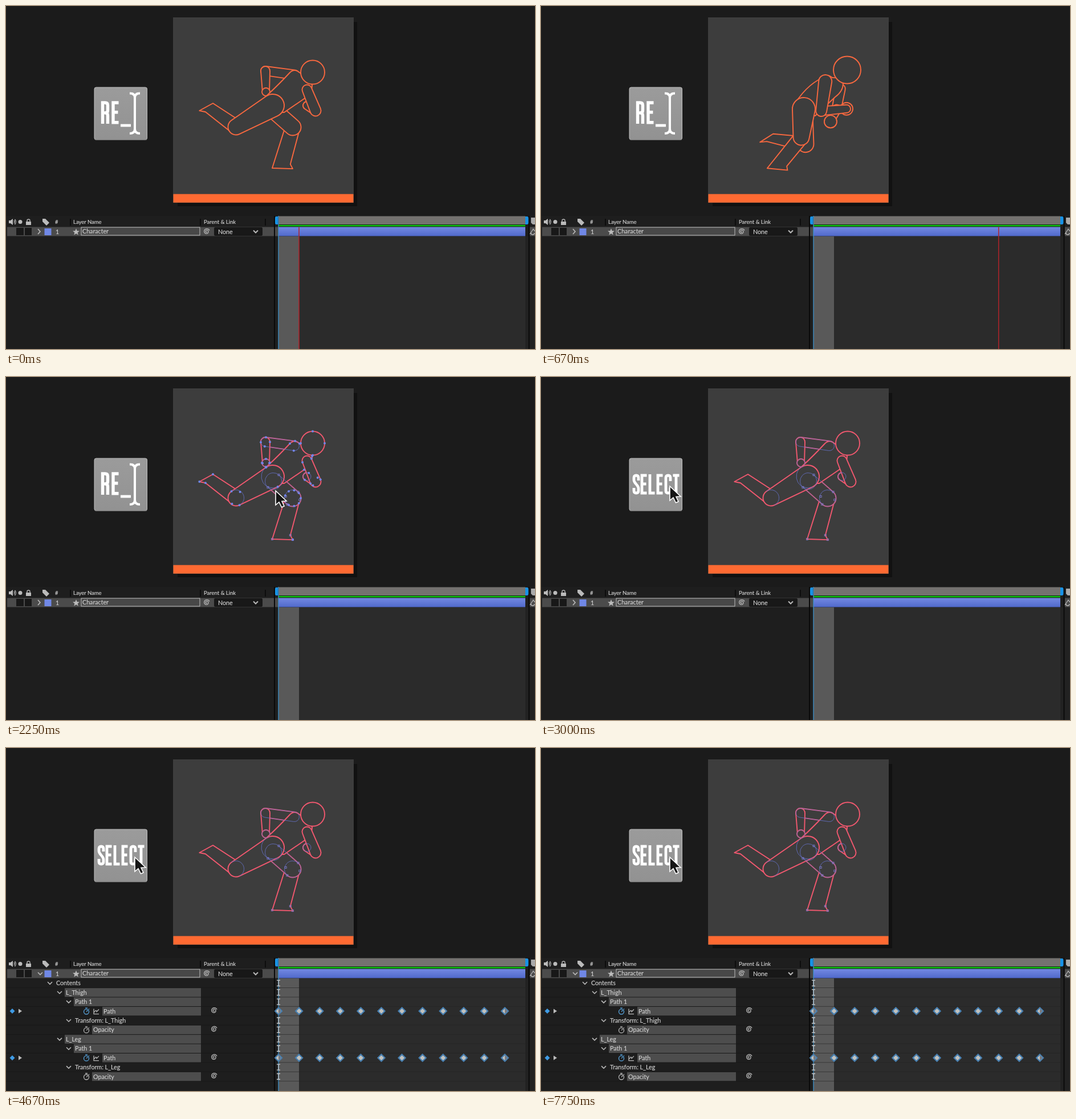
An HTML page that plays this animation: 928x603 px, repeating every 8.08 s.

```html
<!DOCTYPE html>
<html lang="en">
<head>
<meta charset="utf-8">
<title>Path selection</title>
<style>
  html, body { margin: 0; width: 100%; height: 100%; overflow: hidden; background: #1b1b1b; }
  svg { display: block; width: 928px; height: 603px; }
  text { font: 10.7px Lato, "Open Sans", sans-serif; fill: #d2d2d2; stroke: #d2d2d2; stroke-width: .15; }
  .head { font-size: 9.5px; }
  .big { font-size: 30px; letter-spacing: -2px; fill: #fff; stroke: #fff; stroke-width: .5; }
  .line { fill: none; stroke: #b8b8b8; stroke-width: 1.3; }
  .glyph { fill: none; stroke: #fff; stroke-width: 4.8; }
  .body { fill: #3d3d3d; stroke-width: 1.9; stroke-linejoin: round; }
  .hidden { fill: none; stroke: #6976d6; stroke-opacity: .75; }
  .dot { fill: #7386ec; }
  .box { fill: none; stroke: #7a78c8; stroke-width: .9; }
  .key { fill: #c2c2be; stroke: #477fb0; stroke-width: 2.2; }
</style>
</head>
<body>
<svg viewBox="0 0 928 603" xmlns="http://www.w3.org/2000/svg">
  <defs>
    <linearGradient id="cap" x2="0" y2="1"><stop stop-color="#9b9b9b"/><stop offset="1" stop-color="#929292"/></linearGradient>
    <linearGradient id="layer" x2="0" y2="1"><stop stop-color="#7389e2"/><stop offset="1" stop-color="#5069cb"/></linearGradient>
    <path id="arrow" d="M0 0V25L6 20L10.500 29L15 27L11 18.500L19 18Z" fill="#151515" stroke="#fff" stroke-width="1.6"/>
  </defs>
  <rect width="928" height="603" fill="#1b1b1b"/>

  <rect x="301" y="28" width="315" height="324" fill="#111"/>
  <rect x="293" y="20" width="317" height="326" fill="#3d3d3d"/>
  <rect x="293.500" y="330.600" width="316" height="15" fill="#ff6a32"/>
  <g id="figure"></g>

  <rect x="155" y="143" width="92.500" height="92" rx="3" fill="url(#cap)" stroke="#bdbdbd"/>
  <path d="M156 235H247" stroke="#777"/>
  <g id="rename" class="glyph"></g>
  <g id="pick" class="glyph"></g>

  <g id="hint">
    <path aria-label="S" d="M788 143Q787 110 760 110Q731 110 731 143C731 180 791 172 791 211Q791 245 761 245Q731 245 730 211" fill="none" stroke="#ea5039" stroke-width="18"/>
    <text class="big" x="704" y="291">Keyboard</text>
  </g>

  <rect y="369" width="928" height="234" fill="#1e1e1e"/>
  <rect x="478" y="405" width="433" height="198" fill="#2b2b2b"/>
  <rect x="911" y="405" width="17" height="198" fill="#222"/>
  <rect x="478" y="405" width="36" height="198" fill="#595959"/>
  <rect x="2" y="388.500" width="468" height="16" fill="#4b4b4b"/>
  <path d="M18 390H31V403H18ZM33 390H45V403H33Z" fill="#181818"/>
  <path d="M471 369V603M917.500 369V603" stroke="#0a0a0a" stroke-width="2"/>
  <path d="M113 374V386M341 374V386M455 374V386" stroke="#080808" stroke-width="1.500"/>
  <path d="M5 377H8L12 374V385L8 382H5Z" fill="#bbb"/>
  <path d="M14 377Q16 379.500 14 382M15.500 375Q19 379.500 15.500 384" class="line"/>
  <circle cx="25" cy="379.500" r="3.500" fill="#bbb"/>
  <path d="M35 379H44V385H35Z" fill="#bbb"/>
  <path d="M37 379V377Q37 375 39.500 375Q42 375 42 377V379" class="line"/>
  <path d="M64 374H69L76 381L71 386L64 379Z" fill="#bbb"/>
  <text class="head" x="86" y="383">#</text>
  <text class="head" x="118" y="383">Layer Name</text>
  <text class="head" x="347" y="383">Parent &amp; Link</text>
  <rect x="67.500" y="391" width="12" height="12" fill="#7088e6"/>
  <text x="87" y="400.500">1</text>
  <path d="M123 391L124.600 395.200L129 395.400L125.600 398.200L126.700 402.500L123 400L119.300 402.500L120.400 398.200L117 395.400L121.400 395.200Z" fill="#bbb"/>
  <rect x="132" y="389" width="208" height="14" fill="#484848" stroke="#bdbdbd"/>
  <text x="134" y="400">Character</text>
  <rect x="365" y="389" width="85" height="15" rx="2" fill="#181818"/>
  <text x="372" y="400.500">None</text>
  <path d="M434 394.500L438 398.500L442 394.500" class="line" style="stroke-width:2"/>
  <rect x="478" y="369.500" width="433" height="14.500" fill="#747270"/>
  <rect x="478" y="384" width="433" height="4.500" fill="#0c2c0c"/>
  <rect x="478" y="385" width="433" height="2.300" fill="#10c313"/>
  <rect x="472" y="388.500" width="6" height="16" fill="#4b4b4b"/>
  <rect x="478" y="388.500" width="433" height="16" fill="url(#layer)"/>
  <path d="M477 370H474Q472 370 472 373V381Q472 384 474 384H477ZM911 370H914Q916.500 370 916.500 373V381Q916.500 384 914 384H911Z" fill="#1792e6"/>
  <path d="M921 372H928V384H924L921 381Z" fill="#aaa"/>
  <rect x="919" y="388.500" width="9" height="16" fill="#4b4b4b"/>
  <path d="M919 401L925 392L928 396M921 399A3 3 0 1 0 927 399" class="line"/>
  <path id="fold" class="line" style="stroke-width:1.700"/>
  <path id="link" class="line"/>
  <path d="M478 369V603" stroke="#3d93cc" stroke-width="1.300"/>
  <g id="rows"></g>
  <path id="red" d="M0 389V603" stroke="#b3232b" stroke-width="1.500"/>
  <use id="cursor" href="#arrow"/>
</svg>
<script>
const $ = id => document.getElementById(id);
const LOOP = 8080, FPS = 0.012, STEP = 36.1;
const ORANGE = '#f9683f', PINK = '#f2586f';
const mix = (a, b, u) => a + (b - a) * u;

// Limb joints swing between two extremes: [front, back, sideways swing, sag]
const LIMB = {
  knee: [[503, 213], [403.5, 212.5], [-33, -7], [7, 24]],
  heel: [[467, 285], [363, 171], [-36, 2], [-13, 27]],
  shoulder: [[528, 147], [506, 121], [9, 0], [-5, 5]],
  elbow: [[543, 184], [455, 114], [-10, -22], [6, 34]],
  hand: [[528, 175], [456, 151], [-37, 6], [30, 29]]
};
// Body joints only bob: [rest, sag]
const CORE = {
  head: [[538, 116.5], [-1, -4]],
  hip: [[468, 175], [-7, 6]],
  top: [[506, 112], [-4, 9]],
  neck: [[537, 139], [-7, -3]]
};

// Bump once per step, two poses after contact; the mirrored bump is the flight
const turn = pose => pose * Math.PI / 6;
const bump = a => Math.max(0, (1 - Math.cos(2 * a)) / 3 + Math.sin(2 * a) / Math.sqrt(3));
const rise = a => 16 * bump(-a);

function limb(name, pose) {
  const a = turn(pose), [front, back, side, sag] = LIMB[name];
  return front.map((f, i) =>
    mix(f, back[i], (1 - Math.cos(a)) / 2) + side[i] * Math.sin(a) + sag[i] * bump(a) - i * rise(a));
}
const core = (name, pose) =>
  CORE[name][0].map((v, i) => v + CORE[name][1][i] * bump(turn(pose)) - i * rise(turn(pose)));

// Foot lies flat in stance and flips back in recovery
function toe([x, y], pose) {
  const u = Math.max(0, Math.min(1, (1 - 1.9 * Math.cos(turn(pose))) / 2));
  const angle = mix(0.03, 2.64, u), size = mix(36, 27, u);
  return [x + size * Math.cos(angle), y + size * Math.sin(angle)];
}

// Parts: outline, anchor points and, for capsules, the arcs inside the outline
const polar = ([x, y], r, a) => [x + r * Math.cos(a), y + r * Math.sin(a)];

function circle(c, r) {
  const pts = [0, 1, 2, 3].map(i => polar(c, r, i * Math.PI / 2));
  return { pts, d: `M${pts[0]}A${r} ${r} 0 1 1 ${pts[2]}A${r} ${r} 0 1 1 ${pts[0]}Z` };
}

function capsule(a, r1, b, r2) {
  const dx = b[0] - a[0], dy = b[1] - a[1], dir = Math.atan2(dy, dx);
  const off = Math.acos(Math.max(-1, Math.min(1, (r1 - r2) / Math.hypot(dx, dy))));
  const wide = +(off < Math.PI / 2);
  const pts = [polar(a, r1, dir + off), polar(a, r1, dir - off), polar(b, r2, dir - off), polar(b, r2, dir + off)];
  const arc = (r, big, p) => `A${r} ${r} 0 ${big} 1 ${p}`;
  return {
    pts,
    d: `M${pts[0]}${arc(r1, wide, pts[1])}L${pts[2]}${arc(r2, 1 - wide, pts[3])}Z`,
    inner: `M${pts[1]}${arc(r1, 1 - wide, pts[0])}M${pts[3]}${arc(r2, wide, pts[2])}`
  };
}

function shin(knee, heel, tip) {
  const dir = Math.atan2((heel[1] + tip[1]) / 2 - knee[1], (heel[0] + tip[0]) / 2 - knee[0]);
  const instep = polar([mix(heel[0], tip[0], 0.83), mix(heel[1], tip[1], 0.83)], -8, dir);
  const pts = [polar(knee, 12.7, dir + Math.PI / 2), heel, tip, instep, polar(knee, 12.7, dir - Math.PI / 2)];
  return { pts, d: `M${pts.join('L')}Z` };
}

function torso(hip, top, neck, bend) {
  const [hx, hy] = hip, [sx, sy] = top, [nx, ny] = neck;
  const back = [hx - 12 - 8 * bend, hy - 16 + 14 * bend], nape = [sx - 8, sy + 5], front = [sx + 9, sy + 5];
  const curve = [(back[0] + sx) / 2 - 8 * bend, (back[1] + sy) / 2 - 10 * bend];
  const chest = [nx - 14, ny + 24];
  return {
    pts: [back, nape, front, neck, chest],
    d: `M${back}Q${curve} ${nape}Q${sx} ${sy - 3} ${front}Q${nx - 7} ${ny - 11} ${neck}` +
      `Q${nx} ${ny + 14} ${chest}L${hx + 20} ${hy + 12}L${hx} ${hy + 12}Z`
  };
}

// Back to front
function runner(pose) {
  const other = pose + 6, bend = bump(turn(pose));
  const hip = core('hip', pose), palm = 7 + 4 * bend;
  const leg = p => {
    const heel = limb('heel', p);
    return [limb('knee', p), heel, toe(heel, p)];
  };
  const arm = p => ['shoulder', 'elbow', 'hand'].map(name => limb(name, p));
  const far = leg(pose), near = leg(other), fa = arm(other), na = arm(pose);
  return {
    farArm: capsule(fa[0], 8.5, fa[1], 8),
    farFore: capsule(fa[1], 8, fa[2], 6),
    farHand: circle(fa[2], palm),
    farShin: shin(...far),
    farThigh: capsule([hip[0] + 1, hip[1] + 8], 14.5, far[0], 14.5),
    torso: torso(hip, core('top', pose), core('neck', pose), bend),
    nearShin: shin(...near),
    nearThigh: capsule(hip, 20, near[0], 14),
    head: circle(core('head', pose), 21 + 3 * bend),
    nearHand: circle(na[2], palm),
    nearFore: capsule(na[1], 8, na[2], 7),
    nearArm: capsule(na[0], 8.5 + 3 * bend, na[1], 9.5)
  };
}

const paint = (parts, color) => Object.values(parts)
  .map(p => `<path class="body" stroke="${color}" d="${p.d}"/>`).join('');
const dot = ([x, y]) => `<circle class="dot" cx="${x}" cy="${y}" r="2"/>`;
const box = ([x, y]) => `<rect class="box" x="${x - 1.5}" y="${y - 1.5}" width="3" height="3"/>`;

function overlay(parts, all, knee) {
  const { farThigh, nearThigh, farShin, farArm, farHand, nearHand, ...rest } = parts;
  const hidden = [farThigh.inner, nearThigh.inner, farThigh.d, farArm.d, farHand.d, nearHand.d].join('');
  let out = `<path class="hidden" d="${hidden}"/>` + [...farThigh.pts, ...farShin.pts].map(box).join('');
  if (all) {
    out += Object.values({ ...rest, nearThigh, farArm, farHand }).flatMap(p => p.pts).map(dot).join('');
    out += dot(farShin.pts[2]);
  }
  if (knee) {
    for (let i = 0; i < 9; i++) out += dot(polar(LIMB.knee[0], 14, i * Math.PI / 4.5));
  }
  return out;
}

// Button lettering
const GLYPH = {
  S: 'M8 9V4Q8 0 4 0Q0 0 0 4V8C0 14 8 17 8 23V27Q8 31 4 31Q0 31 0 27V22',
  E: 'M8.500 0H0V31H8.500M0 15H7.500',
  L: 'M0 -2V31H8.500',
  C: 'M8 10V4Q8 0 4 0Q0 0 0 4V27Q0 31 4 31Q8 31 8 27V21',
  T: 'M-1.500 0H9.500M4 0V33',
  R: 'M0 33V0H4Q8 0 8 4V12Q8 16 4 16H0M4 16Q8 16 8 20V33'
};
const letters = (word, x, y, pitch, scale) => [...word].map((c, i) =>
  `<path d="${GLYPH[c]}" transform="translate(${x + i * pitch} ${y}) scale(${scale})"/>`).join('');
const serif = x => `M${x} 153.500Q226 153.500 226 161V216Q226 224 ${x} 224`;
$('rename').innerHTML = letters('RE', 169.5, 170, 18.5, 1.12) +
  `<path d="M201 210H219"/><path d="${serif(217)}${serif(235)}" stroke-width="4"/>`;
$('pick').innerHTML = letters('SELECT', 163, 173, 14, 1) + '<use href="#arrow" x="226" y="192"/>';

// Property rows
function spiral(x, y) {
  let d = '';
  for (let a = 0; a < 12; a += 0.4) d += (d ? 'L' : 'M') + polar([x, y], 0.8 + a * 0.4, a + 0.6);
  return d;
}
const diamond = (x, y, r, attrs) => `<path d="M${x} ${y - r}l${r} ${r}l${-r} ${r}l${-r} ${-r}Z" ${attrs}/>`;
const watch = (y, c) => `<g fill="none" stroke="${c}" stroke-width="1.300"><circle cx="141" cy="${y + 1}" r="4.500"/><path d="M139 ${y - 5.500}h4M141 ${y + 1}l2.500 -2.500M145 ${y - 4}l1 1"/></g>`;

function keys(y) {
  let out = watch(y, '#58a5df') + `<path class="line" d="M154 ${y - 4}v9h9M155 ${y + 2}q3 -6 4 -1l4 -4"/>` +
    diamond(11, y, 4.5, 'fill="#3f9be4"') + `<path d="M22 ${y - 4}l6 4l-6 4Z" fill="#bbb"/>`;
  for (let n = 0; n < 12; n++) {
    const x = 478 + STEP * n;
    out += diamond(x, y, 6, 'class="key"');
    if (n % 11 === 0) out += `<path d="M${x} ${y - 4.5}l4.500 4.500l-4.500 4.500Z" fill="#77777b"/>`;
  }
  return out;
}

function row({ label, x, lit, kind }, i) {
  const y = 413.3 + 16.42 * i;
  let out = `<path d="M0 ${y + 8.2}H470" stroke="#181818"/><path d="M478 ${y + 8.2}H911" stroke="#222" stroke-opacity=".6"/>`;
  if (lit) out += `<rect x="${x - 2}" y="${y - 7.6}" width="${344 - x}" height="15.4" fill="#4d4d4d"/>`;
  out += `<text x="${x}" y="${y + 4}">${label}</text>`;
  out += kind ? `<path class="line" d="${spiral(365, y - 1)}"/>`
    : `<path class="line" style="stroke-width:1.600" d="M${x - 15} ${y - 2}l4 4l4 -4"/>`;
  if (kind === 'value') out += watch(y, '#b5b5b5');
  if (kind === 'keys') return out + keys(y);
  return out + `<path class="line" style="stroke:#ccc" d="M475 ${y - 5}h6M478 ${y - 5}v10M475 ${y + 5}h6"/>`;
}
const group = name => [
  { label: name, x: 105, lit: true },
  { label: 'Path 1', x: 121, lit: true },
  { label: 'Path', x: 171, lit: true, kind: 'keys' },
  { label: 'Transform: ' + name, x: 121 },
  { label: 'Opacity', x: 153, lit: true, kind: 'value' }
];
$('rows').innerHTML = [{ label: 'Contents', x: 88 }, ...group('L_Thigh'), ...group('L_Leg')].map(row).join('');
$('link').setAttribute('d', spiral(352, 396.5));

// Pointer stops: time, x, y
const STOPS = [[1000, 575, 300], [1580, 544, 243], [2250, 473, 200], [2670, 226, 192]];
function pointer(ms) {
  const i = STOPS.findIndex(s => s[0] >= ms);
  if (i < 0) return STOPS.at(-1).slice(1);
  const a = STOPS[Math.max(0, i - 1)], b = STOPS[i];
  const u = Math.max(0, (ms - a[0]) / (b[0] - a[0] || 1)), ease = u * u * (3 - 2 * u);
  return [mix(a[1], b[1], ease), mix(a[2], b[2], ease)];
}

const show = (id, on) => $(id).setAttribute('visibility', on ? 'visible' : 'hidden');
let last = -1;

function draw(k) {
  const playing = k < 11, selected = k >= 12, picked = k >= 34, open = k >= 47;
  const parts = runner(playing ? k : 0);
  $('figure').innerHTML = paint(parts, selected ? PINK : ORANGE) +
    (selected ? overlay(parts, !picked, k >= 26 && k < 32) : '');
  show('rename', !picked);
  show('pick', picked);
  show('red', playing);
  $('red').setAttribute('transform', `translate(${514 + STEP * Math.min(k, 9)} 0)`);
  show('rows', open);
  $('fold').setAttribute('d', open ? 'M56 394.500L60 398.500L64 394.500' : 'M56 392L60 396.500L56 401');
  // Key hint fades over one drawing at each end
  $('hint').setAttribute('opacity', Math.max(0, Math.min(1, (5 - Math.abs(k - 45)) / 2)));
  show('cursor', selected && !picked);
  $('cursor').setAttribute('transform', `translate(${pointer(k / FPS)})`);
}

function tick() {
  const k = Math.min(93, Math.floor((performance.now() % LOOP) * FPS + 0.05));
  if (k !== last) draw(last = k);
  requestAnimationFrame(tick);
}
tick();
</script>
</body>
</html>
```
